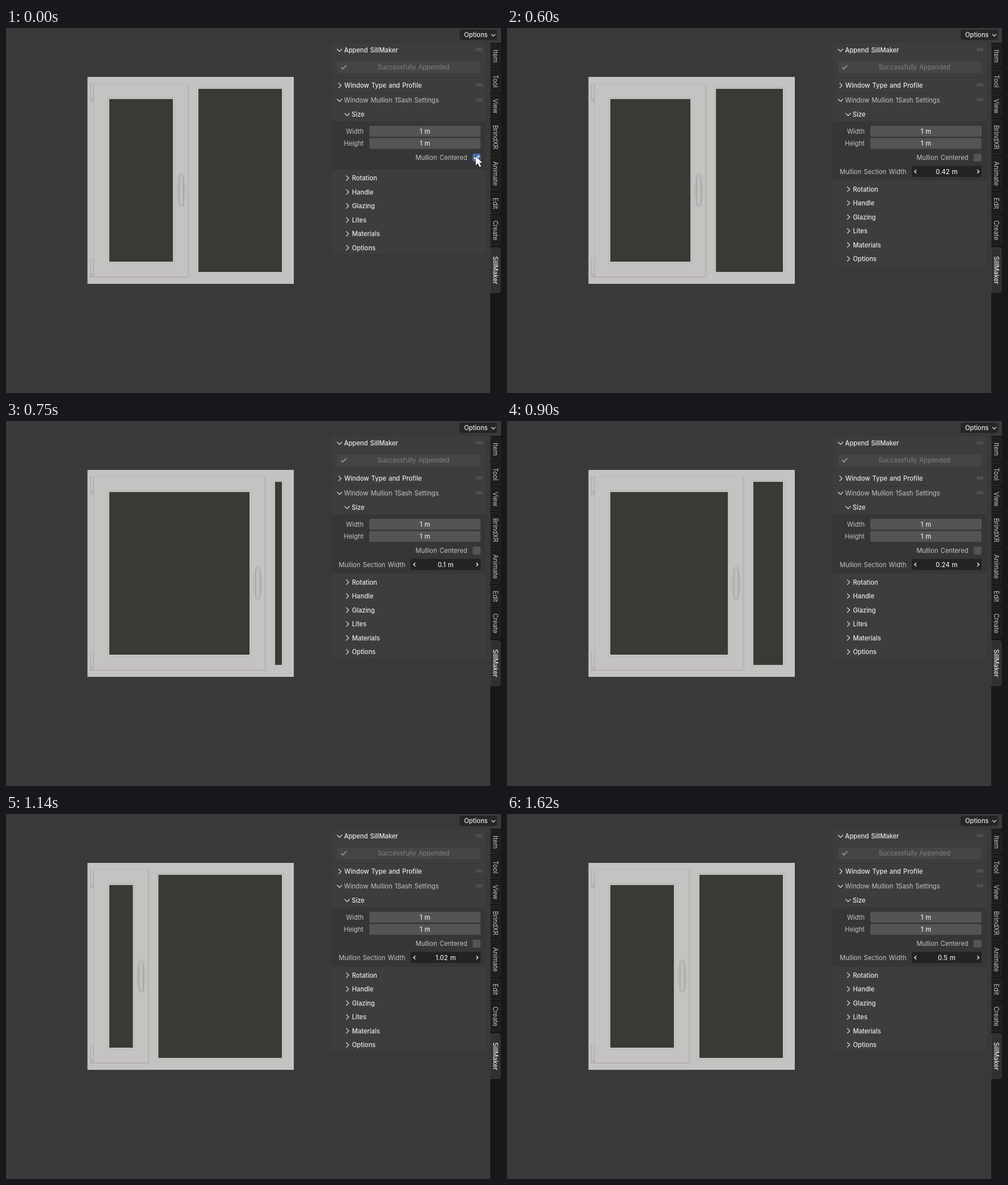
Animation of 872x642 px, one loop 1.71 s. Source, as an HTML page with a canvas:

```html
<!DOCTYPE html>
<html lang="en">
<head>
<meta charset="utf-8">
<title>Mullion width</title>
<style>
html, body { margin: 0; overflow: hidden; background: #393939; }
canvas { display: block; }
</style>
</head>
<body>
<canvas id="stage" width="872" height="642"></canvas>
<script>
const ctx = document.getElementById('stage').getContext('2d');
const LOOP = 1710, STEP = 30, UNCHECK = 120, DRAG = 480;
const PX_PER_M = 364;
const WHITE = '#e8e8e8', LABEL = '#c4c4c4', FIELD = '#545454', PANEL = '#3d3d3d';

// [ms, value] pairs with straight runs between them
const widthKeys = [[570, .5], [600, .42], [660, .252], [750, .1], [810, .1], [900, .239], [930, .239],
  [1080, .9], [1110, .9], [1140, 1.02], [1200, 1.08], [1440, .7], [1620, .5]];
const cursorX = [[150, 827.5], [360, 775]];
const cursorY = [[150, 225.5], [360, 254]];

function along(keys, t) {
  if (t <= keys[0][0]) return keys[0][1];
  for (let i = 1; i < keys.length; i++) {
    const [t0, a] = keys[i - 1], [t1, b] = keys[i];
    if (t <= t1) return a + (b - a) * (t - t0) / (t1 - t0);
  }
  return keys[keys.length - 1][1];
}

function box(x, y, right, bottom, fill, radius = 0) {
  ctx.fillStyle = fill;
  ctx.beginPath();
  ctx.roundRect(x, y, right - x, bottom - y, radius);
  ctx.fill();
}

function outline(x, y, right, bottom, color, radius = 0) {
  ctx.strokeStyle = color;
  ctx.lineWidth = 1;
  ctx.beginPath();
  ctx.roundRect(x, y, right - x, bottom - y, radius);
  ctx.stroke();
}

function line(points, color, width = 1) {
  ctx.strokeStyle = color;
  ctx.lineWidth = width;
  ctx.beginPath();
  points.forEach(([x, y]) => ctx.lineTo(x, y));
  ctx.stroke();
}

function text(str, x, y, color = WHITE, align = 'left') {
  ctx.font = `${color === WHITE ? 500 : 400} 11.2px Inter, sans-serif`;
  ctx.wordSpacing = '1px';
  ctx.textAlign = align;
  ctx.textBaseline = 'alphabetic';
  ctx.fillStyle = color;
  ctx.fillText(str, x, y + 4);
}

function chevron(x, y, angle, size = 4, color = '#d0d0d0') {
  ctx.save();
  ctx.translate(x, y);
  ctx.rotate(angle);
  line([[-size / 2, -size], [size / 2, 0], [-size / 2, size]], color, 1.3);
  ctx.restore();
}

function tick(x, y, color) {
  line([[x - 4.5, y], [x - 1.5, y + 3], [x + 4.5, y - 3.5]], color, 2);
}

function header(str, x, y, open, color) {
  chevron(x, y, open ? Math.PI / 2 : 0, 4.5);
  text(str, x + 8, y, color);
}

function grip(y) {
  for (let i = 0; i < 8; i++) {
    const dotX = 828 + i % 4 * 3, dotY = y + (i >> 2) * 3;
    box(dotX, dotY, dotX + 1.3, dotY + 1.3, '#999');
  }
}

function tab(str, y, bottom, active) {
  box(853, y, 871, bottom, active ? '#303030' : '#1d1d1d', [0, 4, 4, 0]);
  outline(853.5, y + .5, 870.5, bottom - .5, active ? '#3c3c3c' : '#2c2c2c', [0, 4, 4, 0]);
  ctx.save();
  ctx.translate(862, (y + bottom) / 2);
  ctx.rotate(Math.PI / 2);
  text(str, 0, 0, active ? WHITE : '#c8c8c8', 'center');
  ctx.restore();
}

function pane(x, y, right, bottom) {
  box(x - 3.5, y - 4, right + 3.5, bottom + 4, '#bdbbb9');
  box(x - 2, y - 1, right + 2, bottom + 3, '#c5c3c1');
  box(x, y, right, bottom, '#3a3936');
}

function hinge(y, bottom) {
  box(148, y, 155, bottom, '#bfbdbb', 1);
  box(150, y + 2, 153.5, bottom - 5, '#c7c5c3', 1);
  line([[149, y + 1], [149, bottom]], '#aaa8a6');
  line([[154, y + 1], [154, bottom]], '#a5a3a1');
  line([[148.5, bottom - 5], [154.5, bottom - 5]], '#a5a3a1');
  line([[148.5, bottom], [154.5, bottom]], '#a09e9c');
}

function handle(x) {
  const shade = ctx.createRadialGradient(x, 286, 2, x, 286, 34);
  shade.addColorStop(0, '#aaa8a688');
  shade.addColorStop(1, '#c5c3c200');
  ctx.beginPath();
  ctx.ellipse(x, 286, 9, 34, 0, 0, 7);
  ctx.fillStyle = shade;
  ctx.fill();
  box(x - 5, 255, x + 5, 272, '#bbb9b7', 5);
  box(x - 4.5, 261, x + 5, 314, '#a5a3a1', [4, 4, 5, 5]);
  box(x - 3, 261, x + 3.3, 312.5, '#c2c0be', [3, 3, 4, 4]);
}

function drawWindow(shift) {
  const edge = 321 + shift;
  box(143.5, 86, 507, 450, '#c5c3c2');
  outline(154.5, 97.5, edge, 438, '#bab8b6');
  line([[155, 438.3], [edge, 438.3]], '#a9a7a5');
  line([[edge, 98], [edge, 438]], '#aeacaa');
  line([[edge + 1.5, 98], [edge + 1.5, 438]], '#bebcba', 2);
  hinge(97, 129);
  hinge(404, 438);
  pane(182, 125, 294 + shift, 411);
  pane(339 + shift, 107, 486, 429);
  handle(308.5 + shift);
}

function drawPanel(t, width) {
  const checked = t < UNCHECK, extra = checked ? 0 : 19.5, dragging = t >= DRAG;

  box(799, 3, 865, 21, '#262626', 4);
  text('Options', 807, 12);
  chevron(858.5, 12.5, Math.PI / 2, 3.5);

  box(574, 27, 845, 86, PANEL, 3);
  header('Append SillMaker', 587.5, 39, true);
  grip(36);
  box(583, 59, 836, 79, '#454545', 3);
  tick(595, 69, '#8c8c8c');
  text('Successfully Appended', 718, 69, '#818181', 'center');

  box(574, 88, 845, 113, PANEL, 3);
  header('Window Type and Profile', 588, 101, false);
  grip(98);

  box(574, 115, 845, 398 + extra, PANEL, 3);
  header('Window Mullion 1Sash Settings', 587.5, 127, true, LABEL);
  grip(124);
  header('Size', 601, 152, true);
  box(574, 164, 845, 249 + extra, '#363636');

  [['Width', 181.5], ['Height', 203]].forEach(([name, y]) => {
    text(name, 630, y, LABEL, 'right');
    box(640, y - 9.5, 836, y + 9.5, FIELD, 3);
    text('1 m', 738, y, WHITE, 'center');
  });

  text('Mullion Centered', 812.5, 227.5, LABEL, 'right');
  box(822, 221, 836, 235, checked ? '#4772b3' : FIELD, 3);
  if (checked) tick(829, 228, '#fff');
  else {
    const hover = !dragging && along(cursorY, t) > 242;
    text('Mullion Section Width', 703.5, 252.5, LABEL, 'right');
    box(713, 242.5, 836, 262, dragging ? '#232323' : hover ? '#656565' : FIELD, 3);
    if (hover) box(726, 242.5, 823, 262, '#797979');
    if (hover || dragging) {
      chevron(719.5, 252.5, Math.PI, 3, '#fff');
      chevron(830, 252.5, 0, 3, '#fff');
    }
    text(+width.toFixed(2) + ' m', 774.5, 252.5, WHITE, 'center');
  }

  ['Rotation', 'Handle', 'Glazing', 'Lites', 'Materials', 'Options'].forEach((name, i) =>
    header(name, 601.5, 264 + extra + i * 24.5, false));
}

function drawTabs() {
  box(853, 26, 872, 642, '#181818');
  [['Item', 29, 70], ['Tool', 73, 114], ['View', 117, 158], ['BrindXR', 161, 223], ['Animate', 226, 286],
    ['Edit', 290, 327], ['Create', 330, 382], ['SillMaker', 386, 466, true]].forEach(args => tab(...args));
}

function polygon(x, y, points) {
  ctx.beginPath();
  points.forEach(([dx, dy]) => ctx.lineTo(x + dx, y + dy));
  ctx.closePath();
  ctx.lineWidth = 1.5;
  ctx.strokeStyle = '#222';
  ctx.stroke();
  ctx.fillStyle = '#fff';
  ctx.fill();
}

function drawCursor(t) {
  if (t >= DRAG) return;
  const x = along(cursorX, t), y = along(cursorY, t);
  if (y > 242) {
    polygon(x, y, [[-11, 0], [-6, -5], [-6, -1.3], [6, -1.3], [6, -5], [11, 0],
      [6, 5], [6, 1.3], [-6, 1.3], [-6, 5]]);
  } else {
    polygon(x, y, [[0, 0], [0, 16], [3.8, 12.5], [6.8, 19], [9.4, 17.8], [6.6, 11.6], [11.5, 11.5]]);
  }
}

function draw(now) {
  const t = Math.floor(now % LOOP / STEP) * STEP;
  const width = along(widthKeys, t);
  const shift = Math.max(-70.5, Math.min(135, (.5 - width) * PX_PER_M));
  box(0, 0, 872, 642, '#393939');
  drawWindow(shift);
  drawPanel(t, width);
  drawTabs();
  drawCursor(t);
}

const start = performance.now();
function frame() {
  draw(performance.now() - start);
  requestAnimationFrame(frame);
}
frame();
</script>
</body>
</html>
```
